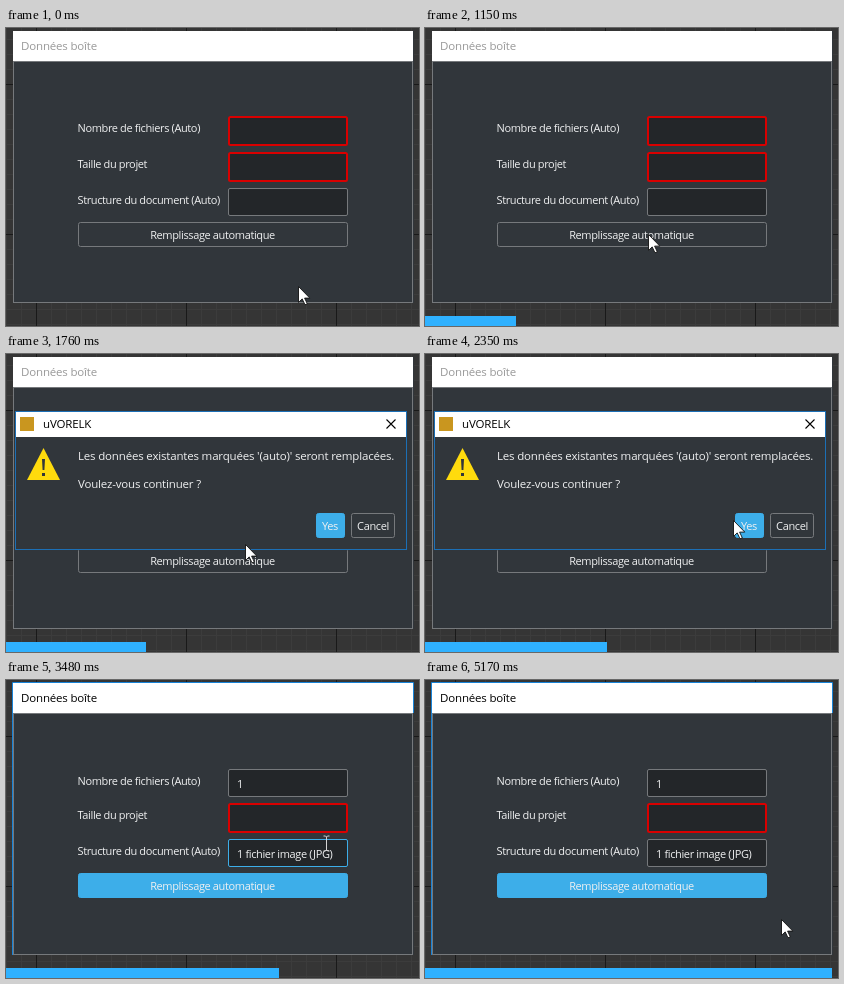
These frames come from a looping animation (413 by 298 pixels, 5250 ms). An HTML page:

```html
<!DOCTYPE html>
<html lang="fr">
<head>
<meta charset="utf-8">
<title>Remplissage automatique</title>
<style>
  html, body { margin: 0; width: 100%; height: 100%; overflow: hidden; background: #353535; }
  svg { display: block; width: 413px; height: 298px; }
  text { font: 11.5px "Open Sans", "Noto Sans", sans-serif; letter-spacing: -.17px; fill: #eff0f1; }
  .form text, .small { font-size: 11px; letter-spacing: -.37px; }
  .mid { text-anchor: middle; }
  .body { fill: #31363b; }
  .line { fill: none; stroke: #76797c; }
  .field { fill: #232629; stroke: #76797c; }
  .bad { stroke: #d90000; stroke-width: 2; }
  .button { fill: #31363b; stroke: #76797c; }
  .hover { stroke: #3daee9; }
  .primary, .active .button { fill: #3daee9; stroke: #3daee9; }
  .title { fill: #999; }
  .active .title { fill: #000; }
  .frame { fill: none; stroke: #1883d7; visibility: hidden; }
  .active .frame { visibility: visible; }
  .off { display: none; }
</style>
</head>
<body>
<svg id="stage" viewBox="0 0 413 298">
  <defs>
    <pattern id="fine" width="15" height="15" patternUnits="userSpaceOnUse" y="11">
      <path d="M0 .5H15M.5 0V15" stroke="#3c3c3c"/>
    </pattern>
    <pattern id="coarse" width="150" height="150" patternUnits="userSpaceOnUse" x="30" y="56">
      <path d="M0 .5H150M.5 0V150" stroke="#191919"/>
    </pattern>
  </defs>
  <rect width="413" height="298" fill="#353535"/>
  <rect width="413" height="298" fill="url(#fine)"/>
  <rect width="413" height="298" fill="url(#coarse)"/>

  <g id="window">
    <rect class="body" x="7" y="3" width="401" height="272"/>
    <rect class="line" x="7.5" y="33.5" width="399" height="241"/>
    <rect x="7" y="3" width="400" height="30" fill="#fff"/>
    <path class="frame" d="M6.5 275V2.5H407.5V33"/>
    <text class="title" x="15" y="22">Données boîte</text>
    <g id="empty" class="form"></g>
    <g id="filled" class="form"></g>
  </g>

  <g id="dialog">
    <rect class="body" x="9.5" y="57.5" width="391" height="138" stroke="#1c6fb5"/>
    <rect x="10" y="58" width="390" height="25" fill="#fff"/>
    <rect x="14" y="63" width="14" height="14" fill="#c9961f"/>
    <text x="37" y="74" style="fill:#000">uVORELK</text>
    <path d="M380.5 65.5l9 9m0-9l-9 9" stroke="#000" stroke-width="1.1"/>
    <path d="M37.5 94L54 126H21Z" fill="#ffdb0d"/>
    <path d="M36 105h3l-.6 11h-1.8zM36 119h3v3h-3z" fill="#31363b"/>
    <text x="72" y="106">Les données existantes marquées '(auto)' seront remplacées.</text>
    <text x="72" y="134">Voulez-vous continuer ?</text>
    <rect class="primary" x="310.5" y="159.5" width="28" height="24" rx="2"/>
    <text class="small mid" x="324" y="176">Yes</text>
    <rect class="line" x="345.5" y="159.5" width="43" height="24" rx="2"/>
    <text class="small mid" x="367" y="176">Cancel</text>
  </g>

  <rect id="bar" y="288" width="0" height="10" fill="#2fb1ff"/>
  <path id="arrow" d="M.5.5V16.4l3.7-3.5 2.8 5.9 2.3-1-2.7-5.7h5.2Z" fill="#fff" stroke="#111" stroke-width=".9"/>
  <path id="beam" d="M-3-7.5H-1L0-6.5 1-7.5H3M0-6.5V6.5M-3 7.5H-1L0 6.5 1 7.5H3" fill="none" stroke="#d4d4d4"/>
</svg>
<script>
const LOOP = 5250, STEPS = 68;
// Start of each run of seven steps.
const RUNS = [70, 610, 1150, 1680, 2230, 2790, 3330, 3870, 4400, 4940];
const PRESS = 13, BLOCKED = 15, ASK = 16, DONE = 41;
// Pointer path: step, x, y.
const PATH = [
  [0, 292, 258], [1, 292, 258], [11, 223, 206], [18, 223, 206], [23, 239, 190],
  [32, 318, 162], [43, 318, 162], [45, 321, 163], [52, 346, 222], [55, 346, 222],
  [61, 356, 239], [67, 356, 239]
];
const $ = id => document.getElementById(id);

function row(label, textY, y, h, bad, value = '') {
  const inset = bad ? 1 : .5;
  return `<text x="71.5" y="${textY}">${label}</text>
    <rect class="field ${bad ? 'bad' : ''}" x="${222 + inset}" y="${y + inset}"
      width="${120 - 2 * inset}" height="${h - 2 * inset}" rx="1.5"/>
    <text x="231" y="${y + 19}">${value}</text>`;
}

function button(y) {
  return `<rect class="button" x="72.5" y="${y}.5" width="269" height="24" rx="2"/>
    <text class="mid" x="206.5" y="${y + 17}">Remplissage automatique</text>`;
}

const LABELS = ['Nombre de fichiers (Auto)', 'Taille du projet', 'Structure du document (Auto)'];
$('empty').innerHTML = row(LABELS[0], 104, 88, 30, true) + row(LABELS[1], 140, 124, 30, true)
  + row(LABELS[2], 176, 160, 28, false) + button(194);
$('filled').innerHTML = row(LABELS[0], 105, 89, 28, false, '1') + row(LABELS[1], 139, 123, 30, true)
  + row(LABELS[2], 175, 159, 28, false, '1 fichier image (JPG)') + button(193);

const startButton = $('empty').querySelector('.button');
const lastField = $('filled').querySelectorAll('.field')[2];

function stepAt(time) {
  const t = time + 6;
  if (t < RUNS[0]) return 0;
  const run = RUNS.findLastIndex(start => t >= start);
  const last = run === RUNS.length - 1;
  const end = last ? LOOP : RUNS[run + 1], count = last ? 4 : 7;
  const inside = Math.floor((t - RUNS[run]) / (end - RUNS[run]) * count);
  return 1 + run * 7 + Math.min(count - 1, inside);
}

function pointerAt(step) {
  const k = Math.max(1, PATH.findIndex(p => p[0] >= step));
  const [s0, x0, y0] = PATH[k - 1], [s1, x1, y1] = PATH[k];
  const u = (step - s0) / (s1 - s0), e = u * u * (3 - 2 * u);
  return [Math.round(x0 + (x1 - x0) * e), Math.round(y0 + (y1 - y0) * e)];
}

const show = (id, on) => $(id).classList.toggle('off', !on);

function draw() {
  const step = stepAt(performance.now() % LOOP);
  const [x, y] = pointerAt(step);
  const done = step >= DONE;
  const overField = done && x >= 222 && x < 342 && y >= 159 && y < 187;
  const overButton = step < BLOCKED && x >= 72 && x < 342 && y >= 194 && y < 219;

  $('window').classList.toggle('active', done || step >= PRESS && step < BLOCKED);
  show('empty', !done);
  show('filled', done);
  show('dialog', step >= ASK && !done);
  show('arrow', !overField);
  show('beam', overField);
  startButton.classList.toggle('hover', overButton);
  lastField.classList.toggle('hover', overField);
  $('arrow').setAttribute('transform', `translate(${x} ${y})`);
  $('beam').setAttribute('transform', `translate(${x - .5} ${y + .5})`);
  $('bar').setAttribute('width', Math.round(step * 413 / STEPS));
  requestAnimationFrame(draw);
}
draw();
</script>
</body>
</html>
```
